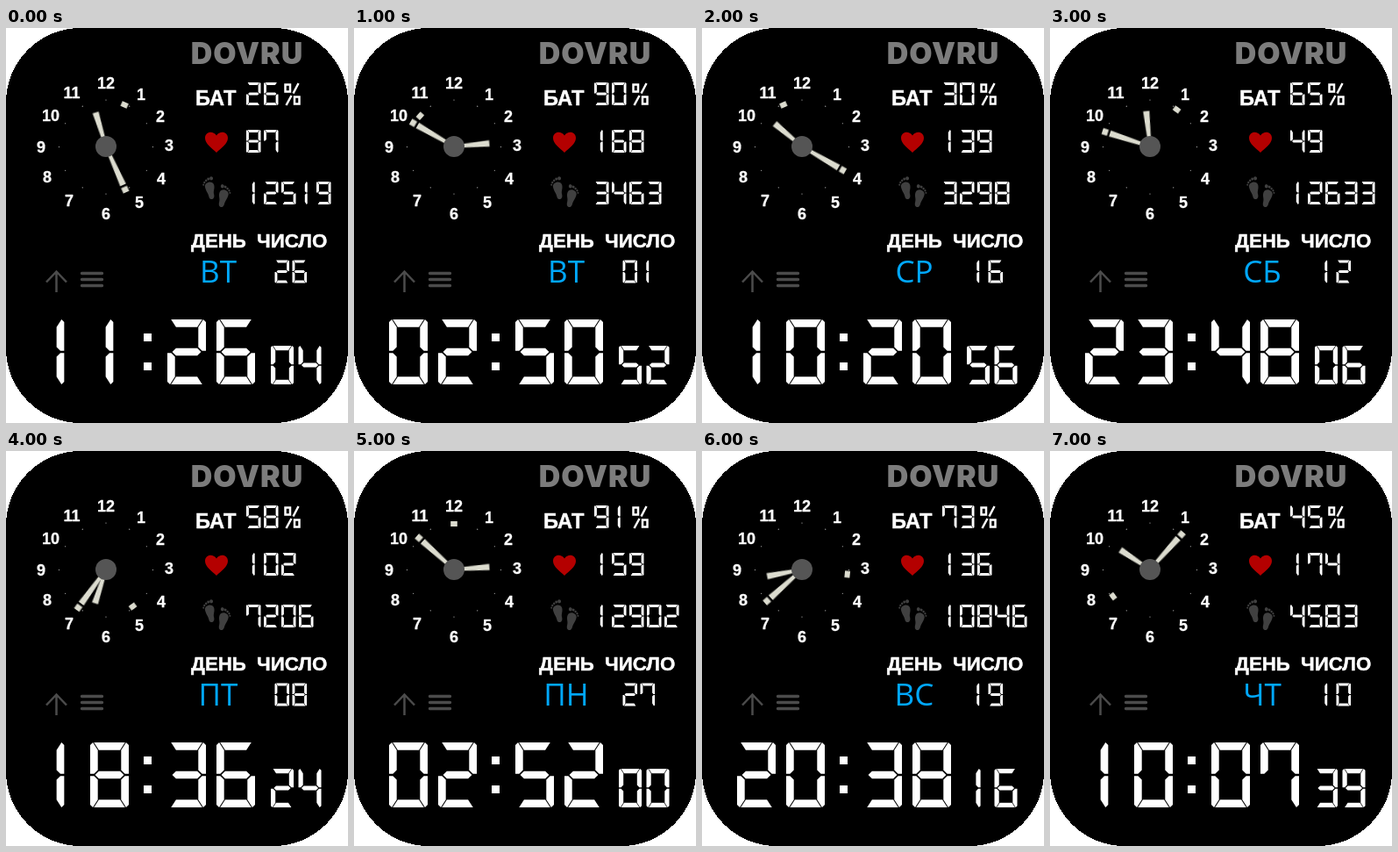
An HTML page that plays this animation: 390x450 px, repeating every 8 s.

```html
<!DOCTYPE html>
<html lang="ru">
<head>
<meta charset="utf-8">
<title>Watch face</title>
<style>
  html, body { margin: 0; width: 100%; height: 100%; overflow: hidden; background: #fff; }
  svg { display: block; width: 390px; height: 450px; }
  text { fill: #fff; font-family: "Liberation Sans", Arial, sans-serif; font-weight: 700; }
  .brand { fill: #7c7c7c; font: 900 34px Inter, sans-serif; letter-spacing: 1px; text-anchor: middle; }
  .label { stroke: #fff; stroke-width: .5; }
  .num { font-size: 18px; text-anchor: middle; stroke: #fff; stroke-width: .3; }
  #day { fill: #00a8ff; font: 400 35px "Open Sans", "Noto Sans", sans-serif; text-anchor: middle; }
  .lcd { fill: #fff; }
  .hand { fill: #dcdccf; filter: blur(.6px); }
  .icon { fill: none; stroke: #4b4b4b; }
  .feet { fill: #404040; }
</style>
</head>
<body>
<svg viewBox="0 0 390 450">
  <rect width="390" height="450" rx="85" shape-rendering="crispEdges"/>
  <text class="brand" x="275" y="40.500">DOVRU</text>

  <g id="dial"></g>
  <g transform="translate(114 135)">
    <path id="hour" class="hand" d="M-2-8L-3.600-40.500H3.600L2-8Z"/>
    <path id="minute" class="hand" d="M-2-8L-3.600-48H3.600L2-8ZM-3.600-50.500V-57H3.600V-50.500Z"/>
    <rect id="second" class="hand" x="-3.800" y="-55" width="7.600" height="6"/>
    <circle r="12" fill="#555"/>
  </g>

  <text class="label" x="216" y="87.500" font-size="23.600">БАТ</text>
  <text class="label" x="211" y="250" font-size="22.300">ДЕНЬ</text>
  <text class="label" x="286" y="250" font-size="22.300">ЧИСЛО</text>
  <text id="day" x="242" y="290"></text>

  <path fill="#b40000" d="M240 142C235 137 227 132 227 125.500C227 118 236 116.500 240 122.500C244 116.500 253 118 253 125.500C253 132 245 137 240 142Z"/>
  <g id="feet" class="feet"></g>
  <path class="icon" stroke-width="2.500" d="M57.500 301V278M46 289.500L57.500 277.500L69 289.500"/>
  <path class="icon" stroke-width="3.400" stroke-linecap="round" d="M86.500 279.500H109.500M86.500 286.500H109.500M86.500 293.500H109.500"/>

  <path class="lcd" d="M157 348h9v9h-9zM157 381h9v9h-9z"/>
  <g fill="none" stroke="#fff" stroke-width="2.500">
    <path d="M318.500 64.500H324V72.500H318.500ZM329 78.500H334.500V86.500H329Z"/>
    <path d="M333.500 63L327.500 74.500M325.500 77L319.500 88"/>
  </g>
  <g id="digits" class="lcd"></g>
</svg>
<script>
const $ = id => document.getElementById(id);

function add(parent, tag, attrs, text = '') {
  const el = document.createElementNS('http://www.w3.org/2000/svg', tag);
  for (const k in attrs) el.setAttribute(k, attrs[k]);
  el.textContent = text;
  parent.appendChild(el);
  return el;
}

// hours, minutes, seconds, battery, pulse, steps, day, date
const STATES = [
  ['11', '26', '04', '26', '87', '12519', 'ВТ', '26'],
  ['02', '50', '52', '90', '168', '3463', 'ВТ', '01'],
  ['10', '20', '56', '30', '139', '3298', 'СР', '16'],
  ['23', '48', '06', '65', '49', '12633', 'СБ', '12'],
  ['18', '36', '24', '58', '102', '7206', 'ПТ', '08'],
  ['02', '52', '00', '91', '159', '12902', 'ПН', '27'],
  ['20', '38', '16', '73', '136', '10846', 'ВС', '19'],
  ['10', '07', '39', '45', '174', '4583', 'ЧТ', '10']
];

const LIT = ['abcdef', 'bc', 'abged', 'abgcd', 'fgbc', 'afgcd', 'afgedc', 'fabc', 'abcdefg', 'abcdfg'];

const BIG = { w: 44, h: 74, t: 8.7, gap: 1.2, pitch: 56 };
const MID = { w: 26, h: 44, t: 5.2, gap: 0.8, pitch: 31.5 };
const TINY = { w: 16.5, h: 26, t: 2.9, gap: 0.6, pitch: 20 };

// Segment outlines of one digit cell; the uprights own the clipped outer corners
function segments({ w, h, t, gap: g }) {
  const m = h / 2, r = t / 2, k = t * 0.35;
  const top = [[k + g, 0], [w - k - g, 0], [w - t - g, t], [t + g, t]];
  const upper = [[w - k, 0], [w, k], [w, m - g], [w - r, m - g], [w - t, m - r - g], [w - t, t]];
  const flipX = s => s.map(([x, y]) => [w - x, y]);
  const flipY = s => s.map(([x, y]) => [x, h - y]);
  return {
    a: top, d: flipY(top),
    b: upper, c: flipY(upper),
    f: flipX(upper), e: flipY(flipX(upper)),
    g: [[r + g, m], [t + g, m - r], [w - t - g, m - r], [w - r - g, m], [w - t - g, m + r], [t + g, m + r]]
  };
}

function lcdPath(text, x, y, size) {
  const shapes = segments(size);
  return [...text].map((ch, i) => {
    // A one sits in the middle of its cell
    const left = x + i * size.pitch - (ch === '1' ? (size.w - size.t) / 2 : 0);
    return [...LIT[ch]].map(s =>
      'M' + shapes[s].map(([px, py]) => (left + px).toFixed(2) + ' ' + (y + py).toFixed(2)).join('L') + 'Z'
    ).join('');
  }).join('');
}

const FIELDS = [
  [0, 40, 332, BIG], [1, 184, 332, BIG], [2, 302, 362, MID],
  [3, 274, 62, TINY], [4, 274, 116, TINY], [5, 274, 175, TINY], [7, 306.5, 264.5, TINY]
].map(([key, x, y, size]) => ({ key, x, y, size, el: add($('digits'), 'path', {}) }));

// Dial numerals and hour dots
[[154, 76], [176, 101], [186, 134], [177, 172], [152, 199], [114, 212],
 [72, 197], [47, 170], [40, 136], [51, 100], [75, 74], [114, 63]].forEach(([x, y], i) => {
  add($('dial'), 'text', { class: 'num', x, y: y + 6 }, i + 1);
  const a = (i + 1) * Math.PI / 6;
  add($('dial'), 'circle', { cx: 114 + 53.5 * Math.sin(a), cy: 135.5 - 53.5 * Math.cos(a), r: 0.6, fill: '#ccc' });
});

function foot(x, y, turn, side) {
  const g = add($('feet'), 'g', { transform: `translate(${x} ${y}) rotate(${turn}) scale(${side} 1.06)` });
  add(g, 'path', { d: 'M-5-3C-5-8 5-9 5.500-3C5.800 1 3 3 3.200 7C3.500 13-3 13-3 8C-3 4-5 2-5-3Z' });
  [[4, -10.5, 2], [0.5, -10.5, 1.4], [-2.3, -9.3, 1.2], [-4.6, -7.7, 1.1], [-6.2, -5.5, 1]]
    .forEach(([cx, cy, r]) => add(g, 'circle', { cx, cy, r }));
}
foot(232.5, 183, -12, 1);
foot(248, 192, 14, -1);

const turn = (id, deg) => $(id).setAttribute('transform', `rotate(${deg})`);

function show(state) {
  const [h, m, s] = state.map(Number);
  turn('hour', h % 12 * 30 + m / 2);
  turn('minute', m * 6);
  turn('second', s * 6);
  for (const f of FIELDS) f.el.setAttribute('d', lcdPath(state[f.key], f.x, f.y, f.size));
  $('day').textContent = state[6];
}

let shown = -1;
function tick() {
  const i = Math.floor(performance.now() / 1000) % STATES.length;
  if (i !== shown) show(STATES[shown = i]);
  requestAnimationFrame(tick);
}
tick();
</script>
</body>
</html>
```
